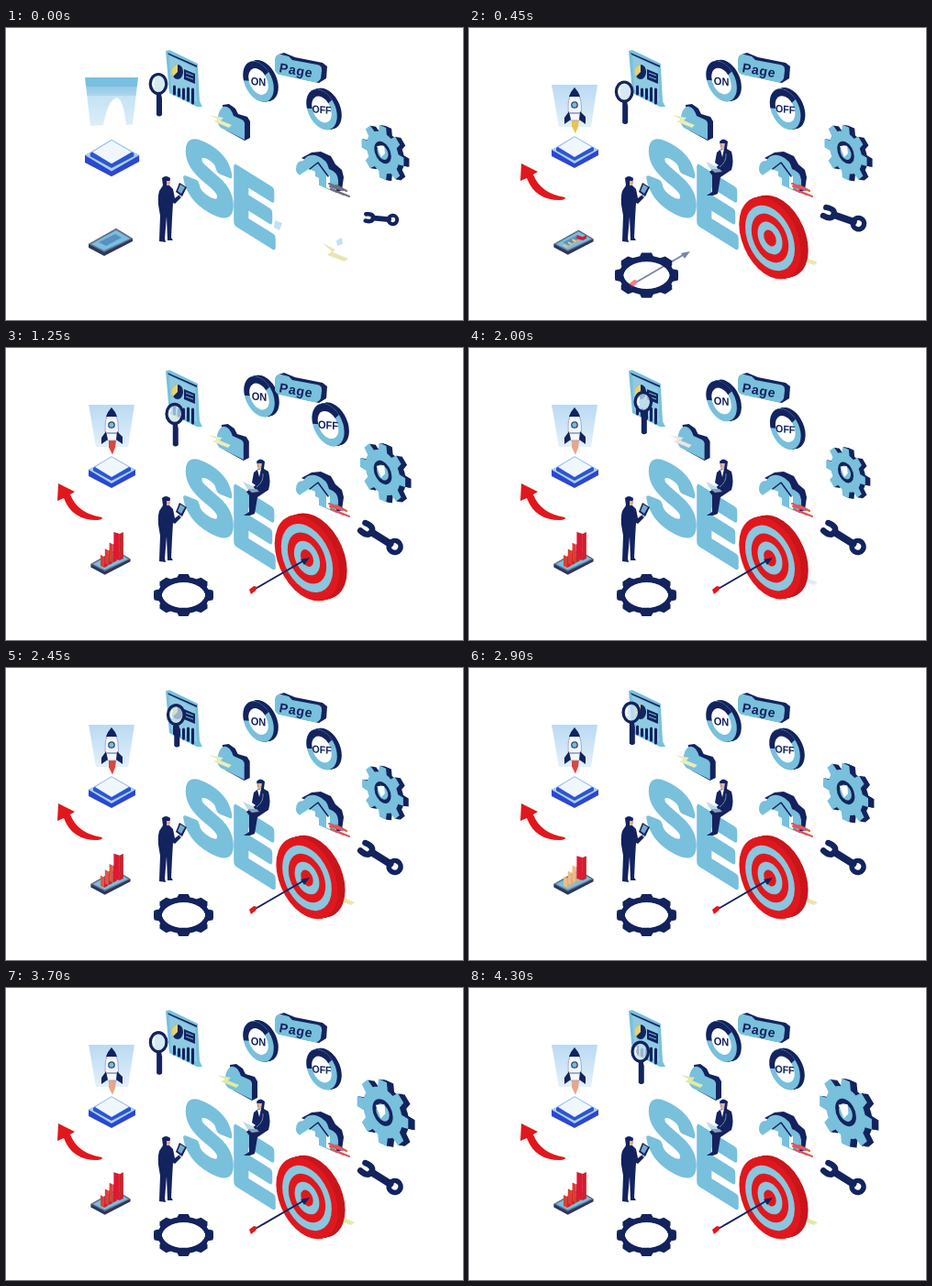
These frames come from a looping animation (498x319 px, 4.35 s). An HTML page:

```html
<!DOCTYPE html>
<html lang="en">
<head>
<meta charset="utf-8">
<title>SEO</title>
<style>
html, body { margin: 0; width: 100%; height: 100%; overflow: hidden; background: #fff; }
svg { display: block; width: 498px; height: 319px; }
text { font-family: "Liberation Sans", Arial, sans-serif; font-weight: bold; }
.navy { fill: #13235e; }
.sky { fill: #78c0dc; }
.red { fill: #e0181d; }
.line { fill: none; stroke: #13235e; stroke-linecap: round; stroke-linejoin: round; }
</style>
</head>
<body>
<svg viewBox="0 0 498 319">
  <defs>
    <linearGradient id="beam" x2="0" y2="1">
      <stop stop-color="#b9daf3"/><stop offset="1" stop-color="#e3f0fa"/>
    </linearGradient>
    <linearGradient id="bands" x2="0" y2="1">
      <stop offset=".18" stop-color="#79bfe0"/><stop offset=".18" stop-color="#93cae6"/>
      <stop offset=".38" stop-color="#acd6ed"/><stop offset=".38" stop-color="#c5e2f3"/>
      <stop offset="1" stop-color="#dceefa"/>
    </linearGradient>
  </defs>

  <!-- report -->
  <path class="sky" d="M174 25L178 24L209 39L209 43L211 80L214 86L208 86L178 71Z"/>
  <path fill="#8fcae2" d="M178 30L206 44L208 81L180 67Z"/>
  <path class="navy" d="M176 27L208 41L208 43L177 29ZM194 45l12 5v11l-12-5z"/>
  <path class="line" stroke-width="3" stroke-linecap="butt" d="M183.500 64v8M188.500 67v7M193.500 67v10M198.500 66v13M203.500 67v15"/>
  <path fill="none" stroke="#78c0dc" d="M196 49l8 3M196 53l8 3"/>
  <ellipse cx="187" cy="48" rx="6" ry="8" class="navy"/>
  <path d="M187 48V40A6 8 0 0 0 182 53Z" fill="#e5d36d"/>
  <g id="lens">
    <path class="navy" d="M-2 11h5l1 5v18q-3 3-6 0z"/>
    <ellipse rx="8.800" ry="10.500" fill="#c9e3ef" fill-opacity=".75" stroke="#13235e" stroke-width="3.200"/>
    <path d="M-4-5Q-7 0-4 4" fill="none" stroke="#fff" stroke-width="1.500"/>
  </g>

  <!-- switches and sign -->
  <g id="on"></g>
  <g id="off"></g>
  <path class="navy" d="M297 29L303 27L315 32L345 38L350 42L349 55L341 60L296 50Z"/>
  <path class="sky" d="M293 34Q294 28 300 29L308 31L312 35L339 40Q345 41 344 47L343 55Q341 60 335 59L298 51Q293 49 293 45Z"/>
  <text class="navy" font-size="14" letter-spacing=".8" transform="matrix(1 .17 -.18 1 297 48)">Page</text>

  <!-- folder cloud -->
  <g id="folder">
    <path class="navy" d="M236 84L243 83L250 88L253 94L263 97L266 102V120L260 123L240 112Z"/>
    <path class="sky" d="M231 97Q232 89 237 86Q244 84 248 96L257 100Q261 102 260 108V122L234 109Q229 104 231 97Z"/>
    <path id="spark" d="M222 95L237 98L234 101L246 106L243 109L226 102L231 100Z"/>
  </g>

  <!-- upload cloud -->
  <path class="navy" d="M322 142L333 136L343 135L354 140L359 149L366 155L368 163L366 177L360 180L348 173L345 153Z"/>
  <path class="sky" d="M316 154Q316 145 324 145Q329 136 340 140Q350 144 352 154Q361 157 362 166Q363 177 357 179L333 168L319 160Q316 158 316 154Z"/>
  <path fill="#fff" d="M318 162L330 154L337 157V162L341 164V174ZM349 160L353 162V176L349 174Z"/>
  <path class="line" stroke-width="1.500" d="M331 154L340 147L351 162"/>
  <path id="plug" fill="none" stroke-width="2" stroke-linecap="round" d="M352 170L362 174M354 176L368 182M360 172L371 178M362 179L374 184M353 173L367 177"/>

  <!-- gears and wrench -->
  <g id="bigGear"></g>
  <g id="wrench">
    <path class="line" stroke-width="8" d="M-13 0H10"/>
    <circle cx="16" r="6.500" class="line" stroke-width="5.600"/>
    <path class="line" stroke-width="6.500" stroke-linecap="butt" d="M-25-5Q-14-7-14 0Q-14 7-25 5"/>
  </g>
  <g id="floorGear"></g>

  <!-- launch pad -->
  <g id="pad">
    <path fill="#2c47cf" d="M-25 0L0-12L26 0V6L0 20L-25 7Z"/>
    <path fill="#a9d0f0" d="M-25 0L0-15L26 0L0 15Z"/>
    <path fill="#2c56d2" d="M-20-2L0-14L21-2V1L0 12L-20 1Z"/>
    <path fill="#eff7fd" d="M-18-3L0-14L19-3L0 8Z"/>
  </g>
  <path id="oldBeam" fill="url(#bands)" d="M86 54H144L138 105L131 106Q128 78 121 76Q111 78 106 106L92 107Z"/>
  <g id="rocket">
    <path fill="url(#beam)" d="M90 62H140L133 108H98Z"/>
    <path id="flame" d="M112 100H120L119 108L116 116L112 108Z"/>
    <path fill="#f3f6fb" stroke="#8c9fc4" stroke-width=".8" d="M115 65Q126 78 121 101H110Q104 79 115 65Z"/>
    <path class="navy" d="M115 65Q119 69 121 75H109Q111 69 115 65ZM109 91L104 98V105L111 100ZM121 91L127 97V105L120 100Z"/>
    <circle cx="115" cy="84" r="3.200" fill="#7cb9df" stroke="#31467f" stroke-width="1.300"/>
    <path fill="none" stroke="#6f86b4" stroke-width="1.300" d="M110 93H121"/>
  </g>

  <!-- growth arrow -->
  <path id="rise" class="red" d="M57 148L75 157L70 160Q78 181 105 185Q105 188 99 188Q72 188 63 164L56 167Z"/>

  <!-- phone -->
  <g id="phone">
    <path fill="#2c365f" d="M90 236L120 219L138 230V233L107 249L90 240Z"/>
    <path fill="#6b7390" d="M90 236L120 219L138 230L107 245Z"/>
    <path class="sky" d="M93 236L120 221L135 230L107 243Z"/>
    <path fill="#5a8fc0" d="M101 234L119 225L126 229L109 238Z"/>
  </g>
  <g id="bars"></g>

  <!-- letters -->
  <g class="sky" stroke="#78c0dc" stroke-width="7.500" stroke-linejoin="round">
    <text font-size="95" transform="matrix(.85 .5 0 1 194 181)">S</text>
    <text font-size="88" transform="matrix(.8 .5 0 1 246.600 210.500)">E</text>
  </g>

  <!-- standing man -->
  <path class="navy" d="M170 164Q174 160 179 164L178 172L182 176L184 186L189 182L191 185L184 192L182 191L181 208L180 229L182 232L176 232L175 206L173 230L174 234L167 233L168 205L166 193Q165 179 169 175L171 172Z"/>
  <path fill="#dcae9d" d="M175 167h4l-1 5h-3zM188 182l4-2 1 3-3 2z"/>
  <path class="navy" d="M189 169L197 174L192 184L185 179Z"/>
  <path fill="#78a9cc" d="M190 171L195 174L191 181L187 178Z"/>

  <!-- seated man -->
  <g id="sitter">
    <path class="navy" d="M273 124Q277 119 282 124L281 132L286 135Q289 146 286 155L274 163L271 181L266 183H259L265 179L265 161L262 157L272 150L268 147L270 136L275 132Z"/>
    <path fill="#dfb3a3" d="M274 126h5l-1 6h-3z"/>
    <path fill="#fff" d="M274 133l4-1-2 9z"/>
    <path fill="#b8dbea" d="M258 146L269 151L273 156L263 154Z"/>
    <path fill="#8d9cb9" d="M263 154L273 154L276 157L268 158Z"/>
    <path fill="none" stroke="#7385ae" d="M280 137Q281 146 273 152"/>
  </g>

  <!-- target -->
  <path id="bolt" d="M345 235L359 242L356 245L373 252L369 255L350 248L355 244Z"/>
  <path id="chips" fill="#c2e2f1" d="M293 210l8 3-3 8-6-3zM360 232l6-3 1 7-6 2z"/>
  <g id="target"></g>
  <g id="dart">
    <path class="line" stroke-width="2" d="M270 264L325 232"/>
    <path class="navy" d="M331 229L321 231L325 237Z"/>
    <path class="red" d="M265 264L270 260L274 261L272 265L267 269Z"/>
  </g>
</svg>
<script>
const LOOP = 4350, STEP = 50;
const NAVY = '#13235e', SKY = '#78c0dc', RED = '#e0181d';
const TILT = 'matrix(.8 .36 0 1 0 0)';
const $ = id => document.getElementById(id);
const set = (id, name, value) => $(id).setAttribute(name, value);
const circle = (r, fill) => `<circle r="${r}" fill="${fill}"/>`;
const path = (d, fill) => `<path d="${d}" fill="${fill}" fill-rule="evenodd"/>`;

// Eased 0..1 between two times, and a soft bump around one time.
function ramp(t, from, to) {
  const x = Math.max(0, Math.min(1, (t - from) / (to - from)));
  return x * x * (3 - 2 * x);
}
const bump = (t, mid, width = 500) => Math.exp(-(((t - mid) / width) ** 2));

function gearPath(teeth, outer, root, hole) {
  const points = [];
  for (let i = 0; i < teeth; i++) {
    for (const [part, r] of [[-.32, root], [-.2, outer], [.2, outer], [.32, root], [.5, root]]) {
      const a = (i + part) * 2 * Math.PI / teeth;
      points.push(`${(r * Math.cos(a)).toFixed(2)} ${(r * Math.sin(a)).toFixed(2)}`);
    }
  }
  return `M${points.join('L')}ZM${hole} 0A${hole} ${hole} 0 1 0 ${-hole} 0A${hole} ${hole} 0 1 0 ${hole} 0Z`;
}

// Stacks copies of a shape along a depth vector, then puts the face on top.
function extrude(dx, dy, side, face, matrix) {
  let out = '';
  for (let i = 6; i > 0; i--) {
    out += `<g transform="translate(${dx * i / 6} ${dy * i / 6})"><g transform="${matrix}">${side}</g></g>`;
  }
  return out + `<g transform="${matrix}">${face}</g>`;
}

function switchDisc(label, size) {
  const face = circle(21, SKY) + path('M0 0L-20 6A21 21 0 0 1 14 -15.600Z', NAVY) + circle(13.5, '#fff');
  return extrude(5, -1, circle(21, NAVY), face, TILT) +
    `<text class="navy" font-size="${size}" text-anchor="middle" transform="matrix(.92 .08 0 1 0 ${size * .36})">${label}</text>`;
}

function build() {
  $('on').innerHTML = switchDisc('ON', 12);
  $('off').innerHTML = switchDisc('OFF', 11.5);

  const cog = gearPath(8, 29, 22, 9);
  $('bigGear').innerHTML = extrude(6, 1, path(cog, NAVY), path(cog, SKY) +
    `<circle r="9.500" fill="${SKY}" stroke="${NAVY}" stroke-width="4"/>` +
    path('M-8 -4L2 -8L3 0L-2 6Z', '#fff'), TILT);

  const ring = path(gearPath(8, 33, 28, 24.5), NAVY);
  $('floorGear').innerHTML = extrude(0, 4, ring, ring, 'matrix(1 0 0 .66 0 0)');

  let rings = '';
  for (let i = 0; i < 5; i++) rings += circle(42 - 8.4 * i, i % 2 ? '#8ac6dd' : RED);
  $('target').innerHTML = extrude(8, -2, circle(42, '#c9151b'), rings, TILT);

  $('bars').innerHTML = '<path/><path/>'.repeat(4);
}

function drawBars(t) {
  const grow = ramp(t, 350, 800) * (1 - .15 * bump(t, 2900));
  const warm = Math.max(1 - ramp(t, 450, 1100), .9 * bump(t, 2950, 400));
  const parts = $('bars').children;
  for (let i = 0; i < 4; i++) {
    const last = i === 3, tint = last ? 0 : warm, w = last ? 6.5 : 4;
    const x = 103 + i * 4.8, y = 238 - i * 2.7, h = Math.max(1, grow * (last ? 29 : 12 + 4 * i));
    const mix = (a, b) => Math.round(a + (b - a) * tint);
    parts[2 * i].setAttribute('d', `M${x} ${y}v${-h}l${w} 2v${h}z`);
    parts[2 * i].setAttribute('fill', `rgb(${mix(222, 238)},${mix(last ? 24 : 60, 205)},${mix(50, 145)})`);
    parts[2 * i + 1].setAttribute('d', `M${x + w} ${y + 2}v${-h}l4 -2v${h}z`);
    parts[2 * i + 1].setAttribute('fill', tint > .5 ? '#d5ae87' : '#c3272c');
  }
  set('bars', 'opacity', ramp(t, 200, 420));
}

function place(id, x, y, scale = 1, angle = 0) {
  set(id, 'transform', `translate(${x} ${y}) rotate(${angle}) scale(${scale})`);
}

// Scales an item about its anchor while it fades in.
function popIn(id, t, x, y) {
  const k = ramp(t, 50, 400), s = .5 + .5 * k;
  set(id, 'opacity', k);
  place(id, x * (1 - s), y * (1 - s), s);
}

function draw(t) {
  const settle = ramp(t, 0, 350), arrive = ramp(t, 50, 400);
  const surge = bump(t, 1250), ebb = bump(t, 2000), late = ramp(t, 2200, 4100);

  // The lens circles steadily over the report and speeds up at the end.
  const angle = (180 - .095 * t - 90 * ramp(t, 3700, 4350)) * Math.PI / 180;
  place('lens', 178 + 12 * Math.cos(angle), 61 + 12.5 * Math.sin(angle));

  place('on', 275 + surge, 58.5 - 5.5 * surge);
  place('off', 344 + 7 * surge, 89 - 5 * surge, 1 + .05 * surge);
  place('bigGear', 410.5, 136, 1 + .08 * (surge - ebb) + .24 * late);
  place('folder', 9 * late - 4 * bump(t, 1800), 0);
  place('wrench', 410, 208.5, .72 + .28 * ramp(t, 0, 600), 5 + 27 * ramp(t, 0, 850));

  place('pad', 115, 139 - 6 * settle, 1.16 - .16 * settle);
  set('oldBeam', 'opacity', 1 - arrive);
  set('rocket', 'opacity', arrive);
  place('rocket', 0, 16 * (1 - arrive));
  const flicker = Math.sin(t / 95);
  set('flame', 'fill', t < 650 ? '#ecc34f' : flicker > .7 ? '#e8a68b' : '#dc4540');
  place('flame', 0, flicker * .8);

  popIn('rise', t, 105, 187);
  popIn('sitter', t, 275, 160);
  place('phone', 11.4 * settle, 23.6 * settle, 1 - .1 * settle);
  drawBars(t);

  place('floorGear', 193.5, 268, .5 + .48 * arrive + .07 * bump(t, 430, 90));
  set('floorGear', 'opacity', arrive);
  place('target', 328, 229.5, .4 + .6 * arrive + .05 * surge);
  set('target', 'opacity', arrive);

  // The dart flies in at constant speed and stops in the bullseye.
  const left = Math.max(0, 600 - t);
  place('dart', -.6 * left, .1 * left);
  set('dart', 'opacity', t < 350 ? 0 : left ? .55 : 1);

  place('bolt', 7 * arrive, 4 * arrive);
  set('bolt', 'fill', ebb > .8 ? '#dfe9ec' : t > 3300 ? '#dcebaa' : '#e8e5b0');
  set('bolt', 'opacity', 1 - .85 * surge);
  set('chips', 'opacity', 1 - arrive);
  set('spark', 'fill', ebb > .8 ? '#f0e2e2' : t > 3300 ? '#e0eaa4' : '#ecebbb');
  set('plug', 'stroke', t < 250 ? '#746c78' : '#dc575b');
}

build();
const start = performance.now();
function tick() {
  const elapsed = (performance.now() - start) % LOOP;
  draw(Math.floor(elapsed / STEP) * STEP);
  requestAnimationFrame(tick);
}
tick();
</script>
</body>
</html>
```
